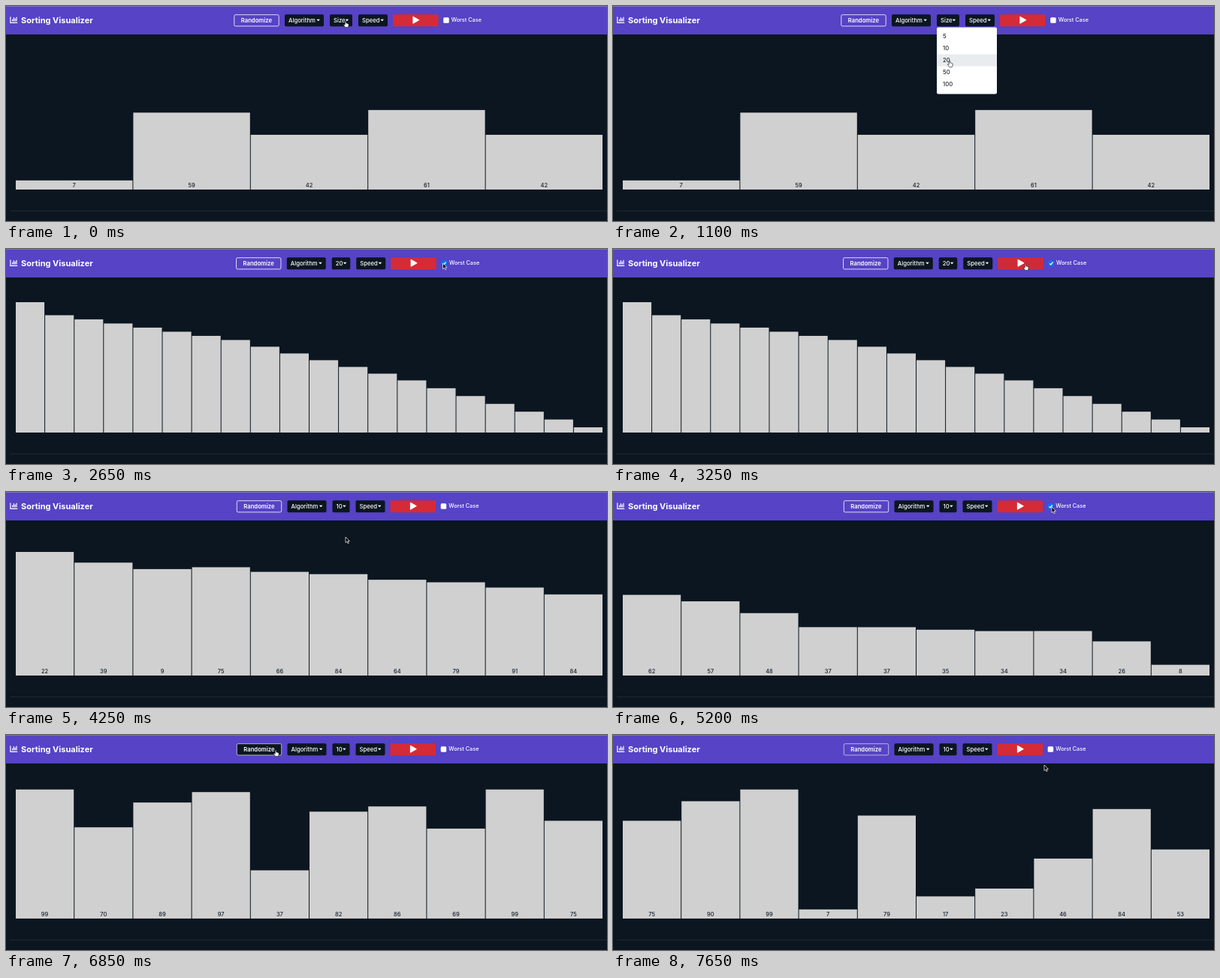
An HTML page that plays this animation: 800x287 px, repeating every 7.7 s.

```html
<!DOCTYPE html>
<html lang="en">
<head>
<meta charset="utf-8">
<title>Sorting Visualizer</title>
<style>
  html, body { margin: 0; width: 100%; height: 100%; overflow: hidden; background: #0b1620; }
  svg { display: block; width: 800px; height: 287px; }
  text { font: 500 7.7px Inter, "Open Sans", sans-serif; fill: #fff; }
  .title { font-size: 11px; font-weight: 700; }
  .mid { text-anchor: middle; }
  .dark { fill: #0b1620; }
  .white { fill: #fff; }
  #random rect { fill: none; stroke: #fff; stroke-width: .8; }
  #random text { font-weight: 600; }
  #random.focus rect { stroke: #d2cee8; }
  #random.hover rect { fill: #0b1620; }
  #play rect { fill: #d52b37; }
  #play.hover rect { fill: #cf2b37; }
  #check rect { fill: #fff; }
  #check path { fill: none; stroke: #fff; stroke-width: 1.2; visibility: hidden; }
  #check.on rect { fill: #0b72f5; }
  #check.on path { visibility: visible; }
  #bars rect { fill: #d0d0d0; }
  #bars text { fill: #17202a; font-size: 7.5px; }
  #menu rect { fill: #fff; }
  #menu text { fill: #212529; }
  #menu g rect { fill: none; }
  #menu g.hover rect { fill: #e9ecef; }
</style>
</head>
<body>
<svg viewBox="0 0 800 287">
  <rect width="800" height="287" class="dark"/>
  <rect width="800" height="38" fill="#5643c5"/>
  <rect width="800" height="1" fill="#7b70bd"/>
  <path d="M5.9 14.8V22.4H14.8M8.6 20V18.2M10.4 20V15.6M12.2 20V17M14 20V15.2"
    fill="none" stroke="#fff" stroke-width="1.2" stroke-linecap="round"/>
  <text class="title" x="20" y="23.3">Sorting Visualizer</text>

  <g id="left">
    <g id="random"><rect x="303.8" y="11.7" width="59.4" height="15.2" rx="1.8"/><text class="mid" x="333.4" y="21.8">Randomize</text></g>
    <g id="algo"><rect class="dark" x="371" y="11.3" width="52" height="15.9" rx="1.8"/><text x="376" y="21.8">Algorithm</text><path class="white" d="M413.4 17.8h4.6l-2.3 2.4z"/></g>
  </g>
  <g id="size"><rect class="dark" y="11.3" height="15.9" rx="1.8"/><text y="21.8"></text><path class="white" d="M-9.4 17.8h4.6l-2.3 2.4z"/></g>
  <g id="right">
    <g id="speed"><rect class="dark" x="469" y="11.3" width="39" height="15.9" rx="1.8"/><text x="474" y="21.8">Speed</text><path class="white" d="M498.4 17.8h4.6l-2.3 2.4z"/></g>
    <g id="play"><rect x="515" y="11.3" width="60.5" height="15.9" rx="1"/><path class="white" d="M541.4 14.6Q541.4 13.6 542.4 14.1L549.9 18.3Q550.5 18.8 549.9 19.3L542.4 23.6Q541.4 24 541.4 23.1Z"/></g>
    <g id="check"><rect x="582.2" y="15.3" width="7.5" height="7.5" rx="1.5"/><path d="M583.9 19.3l1.6 1.6l2.8-3.4"/></g>
    <text x="592.7" y="21.2" style="font-size: 7.3px">Worst Case</text>
  </g>

  <g id="bars"></g>
  <rect x="5" y="273" width="795" height="1" fill="#1d2731"/>
  <g id="menu"><rect y="28.5" width="80" height="89" rx="2"/></g>
  <path id="arrow" d="M0 0V7.6L1.8 6L3 8.7L4.3 8.1L3.1 5.5H5.4Z" stroke="#fff" stroke-width=".7"/>
  <path id="hand" d="M-.8 .6Q0 -.4 .8 .6V3Q1.6 2.6 2 3.3Q2.9 2.9 3.2 3.7Q4.2 3.5 4.2 4.6V6L3.4 8.4H-.4L-2.6 5.3Q-2.7 4.2 -1.6 4.6L-.8 5.3Z" fill="#fff" stroke="#000" stroke-width=".6"/>
</svg>
<script>
const LOOP = 7700, STEP = 50, GROW = 400, TRAVEL = 400;
const BASE = 245, UNIT = 1.74, LEFT = 12.5, WIDTH = 782;
const $ = id => document.getElementById(id);

function set(el, attrs) {
  for (const name in attrs) el.setAttribute(name, attrs[name]);
}

function add(parent, tag, attrs = {}) {
  const el = document.createElementNS("http://www.w3.org/2000/svg", tag);
  set(el, attrs);
  return parent.appendChild(el);
}

const fill = (n, rule) => Array.from({ length: n }, (_, i) => rule(i));

// Piecewise linear through [x, y] points
function through(points, x) {
  const i = Math.max(1, points.findIndex(p => p[0] >= x));
  const [x0, y0] = points[i - 1], [x1, y1] = points[i];
  return y0 + (y1 - y0) * (x - x0) / (x1 - x0);
}

const shuffled = [[0, 82], [3, 40], [5, 54], [7, 14], [8, 66], [10, 12], [13, 22], [15, 63], [19, 29]];
const descending = [[0, 100], [1, 90], [7, 71], [13, 40], [19, 4]];

const scenes = [
  { at: 0, label: "Size", v: [7, 59, 42, 61, 42] },
  { at: 1150, label: "20", v: fill(20, i => through(shuffled, i)) },
  { at: 1930, label: "20", worst: true, v: fill(20, i => through(descending, i)) },
  { at: 4218, label: "10", v: [22, 39, 9, 75, 66, 84, 64, 79, 91, 84] },
  { at: 4830, label: "10", worst: true, v: [62, 57, 48, 37, 37, 35, 34, 34, 26, 8] },
  { at: 5750, label: "10", v: fill(10, i => Math.round(48 + 28 * Math.sin(i * Math.PI / 2 - .62))) },
  { at: 6218, label: "10", v: [99, 70, 89, 97, 37, 82, 86, 69, 99, 75] },
  { at: 7000, label: "10", v: [75, 90, 99, 7, 79, 17, 23, 46, 84, 53] }
];
const inset = { Size: 0, 20: 2.75, 10: 3.5 };
const menuTimes = [[200, 1150], [3800, 4218]];

// Pointer moves: start time and destination
const moves = [
  [-TRAVEL, 452, 20], [500, 448, 73], [1300, 583, 19], [2600, 549, 20], [3350, 446, 20],
  [3800, 452, 60], [4350, 584, 20], [5250, 359, 20], [7150, 574, 40]
];

function pointer(t) {
  const i = moves.findLastIndex(m => m[0] <= t);
  const [start, x, y] = moves[i], [, x0, y0] = moves[Math.max(0, i - 1)];
  const k = Math.min(1, (t - start) / TRAVEL), s = k * k * (3 - 2 * k);
  return [x0 + (x - x0) * s, y0 + (y - y0) * s];
}

// cubic-bezier(.25, .1, .25, 1)
function ease(x) {
  if (x >= 1) return 1;
  const curve = (a, b, s) => 3 * a * s * (1 - s) ** 2 + 3 * b * s * s * (1 - s) + s ** 3;
  let lo = 0, hi = 1;
  for (let i = 0; i < 24; i++) {
    const mid = (lo + hi) / 2;
    if (curve(.25, .25, mid) < x) lo = mid; else hi = mid;
  }
  return curve(.1, 1, lo);
}

const bars = fill(20, () => ({
  rect: add($("bars"), "rect"),
  text: add($("bars"), "text", { class: "mid", y: 242 })
}));

const items = [5, 10, 20, 50, 100].map((n, i) => {
  const item = add($("menu"), "g", { transform: `translate(0 ${32.5 + 16 * i})` });
  add(item, "rect", { width: 80, height: 16 });
  add(item, "text", { x: 8, y: 10.8 }).textContent = n;
  return item;
});

function drawBars(index, t) {
  const { v, at } = scenes[index];
  const before = index ? scenes[index - 1].v : v;
  const p = ease((t - at) / GROW), pitch = WIDTH / v.length;
  bars.forEach(({ rect, text }, i) => {
    const value = v[i] ?? 0, from = before[i] ?? value;
    const height = UNIT * (from + (value - from) * p);
    const x = LEFT + i * pitch;
    rect.style.display = i < v.length ? "" : "none";
    set(rect, { x: x + .5, y: BASE - height, width: pitch - 1, height });
    set(text, { x: x + pitch / 2 });
    text.textContent = v.length < 20 ? v[i] ?? "" : "";
  });
}

function drawToolbar({ label, worst }, t) {
  const d = inset[label], left = 431 + d, right = 461 - d;
  set($("left"), { transform: `translate(${d} 0)` });
  set($("right"), { transform: `translate(${-d} 0)` });
  const [box, text, caret] = $("size").children;
  set(box, { x: left, width: right - left });
  set(text, { x: left + 5 });
  set(caret, { transform: `translate(${right} 0)` });
  text.textContent = label;
  set($("menu"), { transform: `translate(${left} 0)` });
  $("check").classList.toggle("on", !!worst);
  $("random").classList.toggle("focus", t >= 5750);
}

function drawPointer(t, d) {
  const [x, y] = pointer(t);
  const open = menuTimes.some(([a, b]) => t >= a && t < b);
  const inButtons = y >= 11 && y <= 27;
  const hover = (el, over) => { el.classList.toggle("hover", over); return over; };
  const within = (a, b) => inButtons && x >= a && x <= b;
  const hot = [
    hover($("random"), within(303 + d, 363 + d)),
    hover($("algo"), within(371 + d, 423 + d)),
    hover($("size"), within(431 + d, 461 - d)),
    hover($("speed"), within(469 - d, 508 - d)),
    hover($("play"), within(515 - d, 575 - d)),
    ...items.map((item, i) => hover(item, open && Math.floor((y - 32.5) / 16) === i))
  ].some(Boolean);
  $("menu").style.display = open ? "" : "none";
  $("hand").style.display = hot ? "" : "none";
  $("arrow").style.display = hot ? "none" : "";
  for (const id of ["hand", "arrow"]) set($(id), { transform: `translate(${x} ${y})` });
}

function render(t) {
  const index = scenes.findLastIndex(s => s.at <= t);
  drawBars(index, t);
  drawToolbar(scenes[index], t);
  drawPointer(t, inset[scenes[index].label]);
}

const start = performance.now();
function tick() {
  const t = (performance.now() - start) % LOOP;
  render(Math.floor(t / STEP) * STEP);
  requestAnimationFrame(tick);
}
tick();
</script>
</body>
</html>
```
